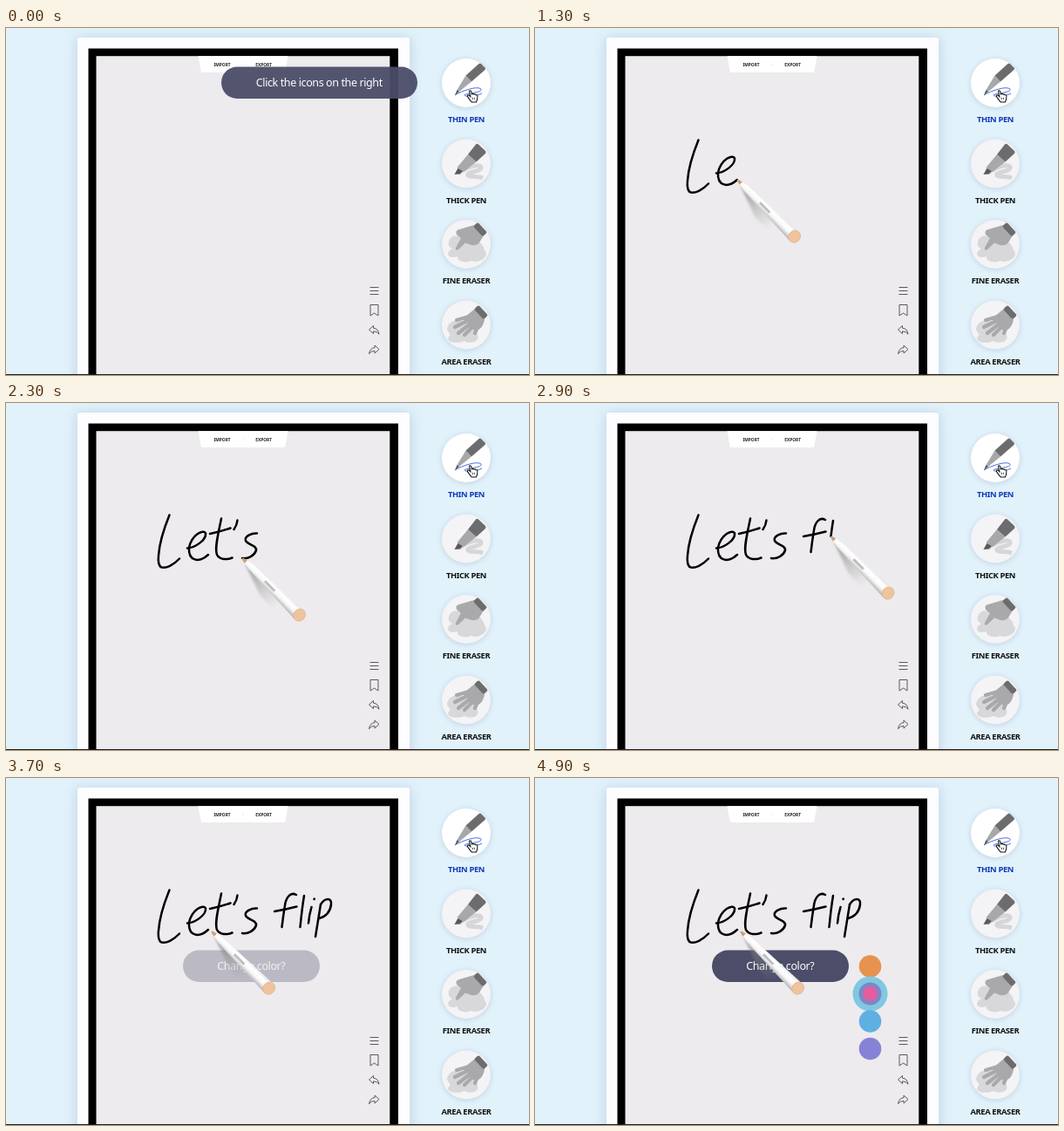
Animation of 600 by 398 pixels, one loop 5000 ms. Source, as an HTML page:

```html
<!DOCTYPE html>
<html lang="en">
<head>
<meta charset="utf-8">
<title>Flip board</title>
<style>
html, body { margin: 0; width: 100%; height: 100%; overflow: hidden; background: #e1f2fb; }
svg { display: block; width: 600px; height: 398px; font-family: "Noto Sans", "Open Sans", sans-serif; }
text { text-anchor: middle; }
.label { font-size: 9.4px; font-weight: 600; letter-spacing: -.38px; }
.tab { font-size: 4.8px; font-weight: 700; fill: #222; }
.pill text { font-size: 12.5px; letter-spacing: -.39px; fill: #fff; }
.pill rect { fill: #4b4d69; }
.disc { fill: #f4f3f5; filter: drop-shadow(0 1px 3px rgba(60, 80, 110, .2)); }
.tools { fill: none; stroke: #4a4a4d; stroke-width: .9; stroke-linejoin: round; }
.fingers { fill: none; stroke: #a9a8ab; stroke-width: 4.2; stroke-linecap: round; }
#ink path { fill: none; stroke: #000; stroke-width: 2.5; stroke-linecap: round; stroke-linejoin: round; }
</style>
</head>
<body>
<svg viewBox="0 0 600 398">
  <defs>
    <linearGradient id="barrel" x1="0" y1="0" x2="0" y2="1">
      <stop offset="0" stop-color="#e2e1e3"/>
      <stop offset=".3" stop-color="#fff"/>
      <stop offset=".6" stop-color="#f8f8f8"/>
      <stop offset="1" stop-color="#b0afb2"/>
    </linearGradient>
    <linearGradient id="shade" gradientUnits="userSpaceOnUse" x1="4" y1="4" x2="36" y2="58">
      <stop offset="0" stop-color="#707070" stop-opacity=".75"/>
      <stop offset="1" stop-color="#999" stop-opacity="0"/>
    </linearGradient>
    <filter id="soft" x="-20%" y="-20%" width="140%" height="140%"><feGaussianBlur stdDeviation="1.4"/></filter>
    <filter id="glow" x="-10%" y="-10%" width="120%" height="120%"><feGaussianBlur stdDeviation="7"/></filter>
  </defs>

  <rect width="600" height="398" fill="#e1f2fb"/>
  <rect x="80" y="11" width="385" height="420" rx="3" fill="#9fb6c8" opacity=".45" filter="url(#glow)"/>
  <rect x="82" y="11" width="381" height="400" rx="3" fill="#fdfdff"/>
  <rect x="94.5" y="23.5" width="355.5" height="390"/>
  <rect x="103.500" y="32.200" width="336.800" height="380" fill="#edebed"/>
  <path d="M220.500 32.200H323.500L320.500 49Q320 51 318 51H226Q224 51 223.500 49Z" fill="#fff"/>
  <text class="tab" x="248" y="43.6">IMPORT</text>
  <text class="tab" x="295.700" y="43.6">EXPORT</text>
  <circle cx="272" cy="42" r=".6" fill="#ccc"/>

  <g class="tools">
    <path d="M417.500 297.500h10M417.500 301.500h10M417.500 305.500h10M418 317.500h9v12.500l-4.500-3-4.500 3z"/>
    <path id="arrow" d="M416.500 346l5-4.500v2.700q5.500.3 6.500 7q-2.500-3.500-6.500-3.300v2.700z"/>
    <use href="#arrow" transform="translate(844.5 22.500) scale(-1 1)"/>
  </g>

  <g id="discs"></g>

  <!-- thin pen -->
  <path d="M515 77C523 72 541 66 545 70C548 74 526 75 526 77C526 79 538 79 546 75" fill="none" stroke="#4a6fdc" stroke-width="1"/>
  <path d="M527.500 54.500L534 61.500L520 73L517.500 71Z" fill="#a8a8aa"/>
  <path d="M542.500 41Q543.700 40 545 41L549.500 45.500Q550.500 47 549.500 48L534 61.500L527.500 54.500Z" fill="#6c6c6e"/>
  <path d="M517.500 71L520 73L515 77Z" fill="#555"/>
  <g transform="translate(535.500 78) scale(1.150) translate(-536.500 -79.500)">
    <path d="M534 84l-2.500-3.500q-1-2 .8-2l2 1.700-1.300-5.200q.2-1.700 1.700-.5l1 3.300q1-1.300 2 .2q1.300-1 1.800.5q1.500-.5 1.700 1l-.3 3.500-1 2.500h-4.500z" fill="#fff" stroke="#111" stroke-width=".9"/>
    <path d="M536.500 81v2M538.300 81v2" stroke="#111" stroke-width=".6"/>
  </g>

  <!-- thick pen -->
  <path d="M519 167C528 159 545 155 545 160C545 165 527 165 530 169C533 172 540 169 547 172" fill="none" stroke="#d6d5d7" stroke-width="5"/>
  <path d="M530 145L539.500 153.500L525 165L517.500 160Z" fill="#a8a8aa"/>
  <path d="M539 133.500Q540.500 132 542 133.500L550 141Q551 142.500 550 144L539.500 153.500L530 145Z" fill="#6c6c6e"/>
  <path d="M518.500 160.700L524 164.300L520.500 167.500L514.500 168Z" fill="#59595b"/>

  <!-- fine eraser -->
  <path d="M508 245C510 236 522 238 525 242C537 238 548 247 549 255C556 262 542 271 534 267C528 270 517 268 518 262C506 266 504 257 512 253C508 251 507 249 508 245Z" fill="#d8d7da"/>
  <path d="M537 226L548 238L543 246Q540 250 534 249L527 246.500L519 254Q515 256 516 252L522 241L517 237Q515 232 520 231Z" fill="#a9a8ab"/>
  <rect x="-3.600" y="-8" width="7.200" height="16" rx="2" transform="translate(544 231) rotate(-43)" fill="#6c6c6e"/>

  <!-- area eraser -->
  <path d="M506 345C508 335 519 333 526 338C538 334 546 344 540 350C546 360 532 363 526 359C516 363 504 360 508 354C512 351 506 349 506 345Z" fill="#d8d7da"/>
  <path d="M538 322L549 334C548 341 544 347 538 347L531 343L527 331Z" fill="#a9a8ab"/>
  <path class="fingers" d="M531 331L517 335M531 335L515 343M533 339L519 350M536 342L526 352M541 342L538 350"/>
  <rect x="-3.600" y="-8" width="7.200" height="16" rx="2" transform="translate(545 326) rotate(-43)" fill="#6c6c6e"/>

  <g id="hint" class="pill">
    <rect x="247" y="44.500" width="225" height="36.500" rx="18.200"/>
    <text x="359.300" y="67">Click the icons on the right</text>
  </g>
  <g id="ink"></g>
  <g id="ask" class="pill">
    <rect x="203" y="197.500" width="157" height="36.500" rx="18.200"/>
    <text x="281.300" y="220">Change color?</text>
  </g>
  <g id="colors">
    <circle cx="384.500" cy="216" r="12.800" fill="#e69350"/>
    <circle id="ring" cx="384.500" cy="247.500" fill="#80c8e1"/>
    <circle id="mid" cx="384.500" cy="247.500" r="13" fill="#7f86c4"/>
    <circle id="core" cx="384.500" cy="247.500" fill="#e65c9f"/>
    <circle cx="384.500" cy="279" r="12.800" fill="#5eb0e3"/>
    <circle cx="384.500" cy="310.500" r="12.800" fill="#8683d6"/>
  </g>
  <g id="pen">
    <path d="M3 5L20 42L36 60L50 54Z" fill="url(#shade)" filter="url(#soft)"/>
    <g transform="rotate(44.800)">
      <path d="M5 -2L14 -3.800L91 -7.300V7.300L14 3.800L5 2Z" fill="url(#barrel)"/>
      <path d="M0 -.8Q3 -2 6 -2.300V2.300Q3 2 0 .8Z" fill="#caa077"/>
      <rect x="37" y="-1" width="16" height="2.800" fill="#bdbcbf"/>
      <ellipse cx="92.500" cy="0" rx="6.600" ry="7.300" fill="#efc49d" stroke="#ddb48c" stroke-width=".8"/>
    </g>
  </g>
  <rect y="397" width="600" height="1" fill="#1a1c1f"/>
</svg>
<script>
const LOOP = 5000, STEP = 100;
const $ = id => document.getElementById(id);
const clamp = v => Math.max(0, Math.min(1, v));
const ramp = (t, a, b) => clamp((t - a) / (b - a));

function add(parent, tag, attrs, text) {
  const el = document.createElementNS("http://www.w3.org/2000/svg", tag);
  for (const key in attrs) el.setAttribute(key, attrs[key]);
  if (text) el.textContent = text;
  return parent.appendChild(el);
}

["THIN PEN", "THICK PEN", "FINE ERASER", "AREA ERASER"].forEach((name, i) => {
  const y = 63 + i * 92.5;
  const disc = add($("discs"), "circle", { class: "disc", cx: 528, cy: y, r: 28 });
  if (!i) disc.style.fill = "#fff";
  add($("discs"), "text", { class: "label", x: 528, y: y + 45.1, fill: i ? "#111" : "#1038b8" }, name);
});

// start, end, path of each pen stroke
const strokes = [
  [640, 800, "M187.500 128.500C182 142 176 160 175 175Q174 185 177.500 188"],
  [800, 900, "M177.500 188C183 191 193 185 199 178.500"],
  [1000, 1300, "M208 166.500C217 166 230 157 229 149.500C227 144 213 151 210 166C209 181 221 184 232 174"],
  [1400, 1500, "M234 150Q246 147.500 257.500 143.500"],
  [1500, 1700, "M247 132.500C244 148 239 166 242 174C245 180 254 180 259.500 177.500"],
  [1800, 1900, "M265.500 134.500Q265 140 261.500 145"],
  [2000, 2300, "M288 149.500C282 149 273 153 275 158C278 163 288 163 287 169C285 175 278 179 271 178"],
  [2360, 2400, "M308 153Q320 151 333.500 147.500"],
  [2500, 2700, "M333 134C326 130 321 138 320 146Q318 158 316.500 171"],
  [2800, 3000, "M342 135Q339.500 150 337.500 171"],
  [3050, 3200, "M350.500 148Q348 156 347 166.500"],
  [3290, 3300, "M353.500 139L353.800 138.500"],
  [3350, 3450, "M361 145Q358 163 355 182"],
  [3450, 3600, "M361 145C366 137 374 137 373 145C372 153 367 159 359 161"]
].map(([start, end, d]) => {
  const el = add($("ink"), "path", { d });
  const len = el.getTotalLength();
  el.style.strokeDasharray = len + " " + (len + 10);
  return { start, end, el, len };
});

function tipAt(t) {
  if (t >= 3700) return { x: 236, y: 176 };
  let last = null;
  for (const s of strokes) {
    if (t < s.start) {
      const from = last.el.getPointAtLength(last.len), to = s.el.getPointAtLength(0);
      const k = ramp(t, last.end, s.start);
      return { x: from.x + (to.x - from.x) * k, y: from.y + (to.y - from.y) * k };
    }
    if (t <= s.end) return s.el.getPointAtLength(s.len * ramp(t, s.start, s.end));
    last = s;
  }
  return last.el.getPointAtLength(last.len);
}

function draw(t) {
  const writing = t >= 700;
  $("hint").style.opacity = writing ? 0 : .95 + .03 * ramp(t, 0, 400);
  $("pen").style.display = writing ? "" : "none";
  for (const s of strokes) {
    const k = ramp(t, s.start, s.end);
    s.el.style.display = writing && k > 0 ? "" : "none";
    s.el.style.strokeDashoffset = s.len * (1 - k);
  }
  if (writing) {
    const p = tipAt(t);
    $("pen").setAttribute("transform", `translate(${p.x} ${p.y})`);
  }
  $("ask").style.opacity = t < 3700 ? 0 : .3 + .7 * ramp(t, 3700, 4100);
  $("colors").style.opacity = ramp(t, 4200, 4500);
  const pulse = ramp(t, 4500, 4900);
  $("ring").setAttribute("r", 12.8 + 7.2 * pulse);
  $("mid").style.opacity = pulse;
  $("core").setAttribute("r", 12.8 - 4.6 * pulse);
}

const begin = performance.now();
function tick() {
  const t = (performance.now() - begin) % LOOP;
  draw(Math.floor(t / STEP) * STEP);
  requestAnimationFrame(tick);
}
tick();
</script>
</body>
</html>
```
